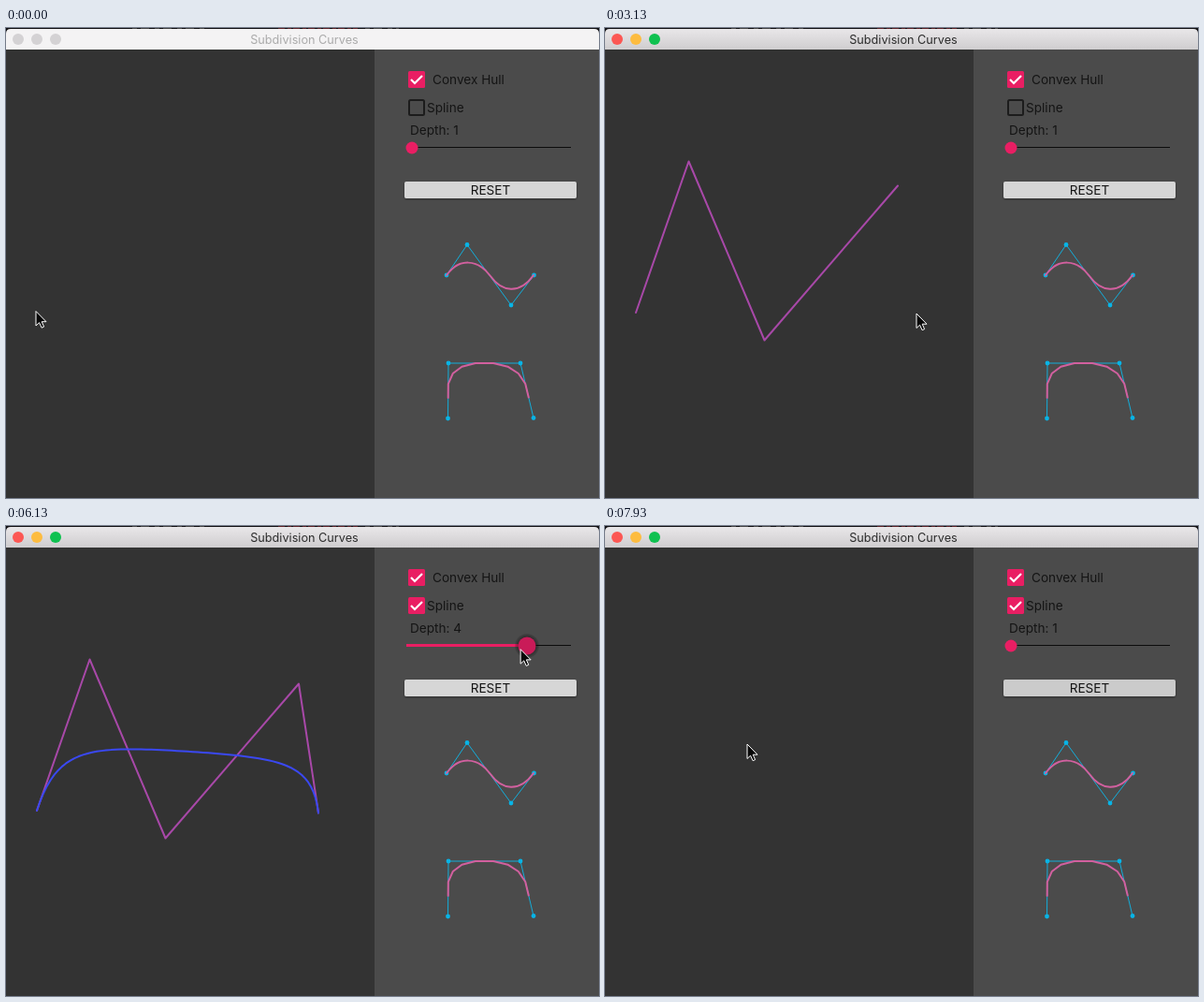
An HTML page that plays this animation: 634x502 px, repeating every 8 s.

```html
<!DOCTYPE html>
<html lang="en">
<head>
<meta charset="utf-8">
<title>Subdivision Curves</title>
<style>
  html, body { margin: 0; width: 100%; height: 100%; overflow: hidden; background: #333; }
  svg { display: block; width: 634px; height: 502px; }
  text { font: 13.6px Inter, "Open Sans", sans-serif; fill: #141414; }
  .line { fill: none; stroke-width: 2; stroke-linejoin: round; stroke-linecap: round; }
  .guide { fill: none; stroke: #13aedb; stroke-width: 1; }
  .sample { stroke: #d2609f; }
  .dot { fill: #08b4e6; }
  .pink { fill: #e91e63; }
  .tick { fill: none; stroke: #fff; stroke-width: 2.2; }
  #title { font-size: 12.7px; text-anchor: middle; }
</style>
</head>
<body>
<svg viewBox="0 0 634 502">
  <defs>
    <linearGradient id="active" x2="0" y2="1">
      <stop stop-color="#e9e7e9"/><stop offset="1" stop-color="#cfcdcf"/>
    </linearGradient>
    <filter id="shadow" x="-10%" y="-30%" width="120%" height="180%">
      <feDropShadow dx="0" dy="1" stdDeviation="1.3" flood-opacity=".45"/>
    </filter>
    <radialGradient id="halo">
      <stop offset=".7" stop-opacity=".4"/><stop offset="1" stop-opacity=".1"/>
    </radialGradient>
  </defs>

  <rect width="634" height="502" fill="#333"/>
  <rect width="634" height="5" fill="#121114"/>
  <path d="M135 .5H212M384 .5H420" stroke="#444" stroke-dasharray="5 4 9 6"/>
  <path d="M291 .5H376" stroke="#5c2026" stroke-dasharray="7 3 4 2"/>
  <path id="bar" d="M0 23V6Q0 1 5 1H629Q634 1 634 6V23Z"/>
  <g id="lights">
    <circle cx="13" cy="12" r="6"/><circle cx="33" cy="12" r="6"/><circle cx="53" cy="12" r="6"/>
  </g>
  <text id="title" x="319" y="17">Subdivision Curves</text>

  <rect x="394" y="23" width="240" height="479" fill="#4b4b4b"/>
  <rect class="pink" x="430" y="46" width="18" height="18" rx="1.5"/>
  <path class="tick" d="M433 55l4 4 8-8"/>
  <text x="456" y="60">Convex Hull</text>
  <rect x="431" y="77" width="16" height="16" rx="1.5" fill="none" stroke="#1c1c1c" stroke-width="2"/>
  <g id="spline">
    <rect class="pink" x="430" y="76" width="18" height="18" rx="1.5"/>
    <path class="tick" d="M433 85l4 4 8-8"/>
  </g>
  <text x="450" y="90">Spline</text>
  <text id="depth" x="432" y="114"></text>

  <path d="M428 127.5H604" stroke="#0c0c0c"/>
  <path id="fill" stroke="#e91e63" stroke-width="3"/>
  <g id="thumb">
    <circle id="glow" r="13" fill="url(#halo)"/>
    <circle id="knob"/>
  </g>
  <rect id="button" x="426" y="164" width="184" height="18" rx="2" filter="url(#shadow)"/>
  <text x="518" y="178" text-anchor="middle">RESET</text>

  <g id="icons"></g>
  <path class="line sample" d="M471 264C484 246 504 246 518 265C530 282 549 285 564 264"/>
  <path id="arch" class="line sample"/>

  <path id="hull" class="line" stroke="#a848a8"/>
  <path id="curve" class="line" stroke="#3a48f2"/>
  <path id="cursor" d="M0 0V15.500L3.600 12.200L6.100 17.700L8.600 16.600L6.200 11.200H11Z"
        fill="#080808" stroke="#fff" stroke-linejoin="round"/>
</svg>
<script>
const LOOP = 8000;
const CHECK = 4350, PRESS = 5050, CURVE = 5680, RELEASE = 6930, RESET = 7550;
const SLIDER_X = 434, STEP = 41, SLIDER_LAG = 50;
const LIGHTS = ["#fc5753", "#fdbc40", "#0fc150"];

const points = [[33, 304], [89.5, 142.5], [170.5, 333.5], [313, 168.5], [334, 306.5]];
const wave = [[471, 264], [493, 231.5], [540, 296], [564.5, 264]];
const arch = [[472.5, 417], [473, 358], [550, 358], [564, 416.5]];
const clickTime = i => 410 + 685 * i;

// Places where the cursor rests; it eases from one to the next.
const rest = (arrive, leave, x, y) => ({ arrive, leave, x, y });
const stops = [
  ...points.map(([x, y], i) => rest(clickTime(i) - 60, clickTime(i) + 180, x - 1, y - 1.5)),
  rest(4200, 4500, 438, 85),
  rest(4950, 5450, 435, 128),
  rest(6480, 6480, 592, 133),
  rest(6795, 7000, 432, 123),
  rest(7400, 7780, 540, 170),
  rest(7925, LOOP, 152, 233)
];

const el = id => document.getElementById(id);
const set = (id, attrs) => {
  for (const name in attrs) el(id).setAttribute(name, attrs[name]);
};
const show = (id, visible) => set(id, { visibility: visible ? "visible" : "hidden" });
const toPath = list => list.length > 1 ? "M" + list.join("L") : "";
const mix = (a, b, u) => a.map((v, i) => v + (b[i] - v) * u);

// Each pass halves the whole polygon by de Casteljau and reuses all its points.
function subdivide(polygon, depth) {
  if (!depth) return polygon;
  const left = [], right = [];
  for (let row = polygon; row.length; row = row.slice(1).map((p, i) => mix(row[i], p, .5))) {
    left.push(row[0]);
    right.unshift(row[row.length - 1]);
  }
  return subdivide([...left, ...right.slice(1)], depth - 1);
}

// Chaikin corner cutting.
const cutCorners = list => list.slice(1).flatMap((p, i) =>
  [mix(list[i], p, .25), mix(list[i], p, .75)]);

function cursorAt(t) {
  const i = Math.max(0, stops.findLastIndex(stop => stop.arrive <= t));
  const a = stops[i], b = stops[i + 1] || a;
  if (t <= a.leave) return [a.x, a.y];
  const u = (t - a.leave) / (b.arrive - a.leave);
  return mix([a.x, a.y], [b.x, b.y], u * u * (3 - 2 * u));
}

function render(t) {
  const active = t >= clickTime(0), pressed = t >= PRESS && t < RELEASE, cleared = t >= RESET;
  const notch = pressed ? Math.round((cursorAt(t - SLIDER_LAG)[0] - SLIDER_X) / STEP) : 0;
  const depth = notch + 1, thumbX = SLIDER_X + STEP * notch;

  set("bar", { fill: active ? "url(#active)" : "#f4f3f4" });
  el("title").style.fill = active ? "#2c2c2c" : "#ababab";
  [...el("lights").children].forEach((light, i) =>
    light.setAttribute("fill", active ? LIGHTS[i] : "#d4d2d4"));

  show("spline", t >= CHECK);
  el("depth").textContent = "Depth: " + depth;
  set("fill", { d: notch ? `M428 127.5H${thumbX}` : "" });
  set("thumb", { transform: `translate(${thumbX} 128)` });
  set("knob", { r: pressed ? 9.5 : 6.5, fill: pressed ? "#c91b58" : "#e91e63" });
  show("glow", pressed);
  set("button", { fill: cleared ? "#cbcbcb" : "#d6d6d6" });

  const placed = cleared ? [] : points.filter((p, i) => t >= clickTime(i));
  set("hull", { d: toPath(placed) });
  set("curve", { d: t >= CURVE && !cleared ? toPath(subdivide(points, depth)) : "" });
  set("cursor", { transform: `translate(${cursorAt(t)})` });
}

el("icons").innerHTML = [wave, arch].map(list => `<path class="guide" d="${toPath(list)}"/>` +
  list.map(([x, y]) => `<circle class="dot" cx="${x}" cy="${y}" r="2.4"/>`).join("")).join("");
set("arch", { d: toPath(cutCorners(cutCorners(arch))) });

const start = performance.now();
function tick() {
  render((performance.now() - start) % LOOP);
  requestAnimationFrame(tick);
}
tick();
</script>
</body>
</html>
```
